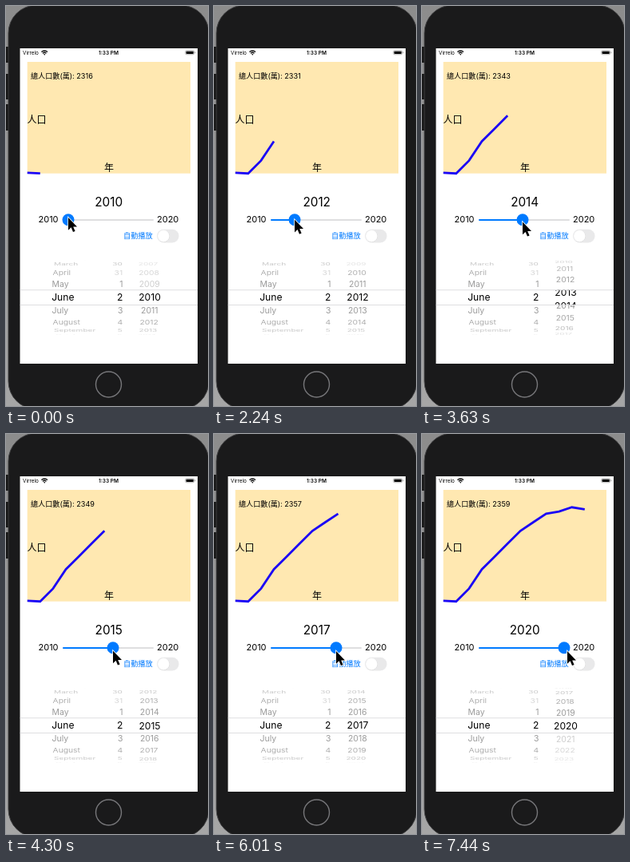
An HTML page that plays this animation: 253x501 px, repeating every 8 s.

```html
<!DOCTYPE html>
<html lang="zh-Hant">
<head>
<meta charset="utf-8">
<title>Population chart</title>
<style>
  html, body { margin: 0; width: 100%; height: 100%; overflow: hidden; background: linear-gradient(#8c8c8c, #a6a6a6); }
  svg { display: block; width: 100vw; height: 100vh; font-family: Inter, "Noto Sans CJK TC", "Noto Sans CJK", sans-serif; }
</style>
</head>
<body>
<svg viewBox="0 0 253 501">
  <defs>
    <clipPath id="band"><rect x="18" y="356" width="222" height="18.5"/></clipPath>
    <clipPath id="wheel"><path d="M18 318H240V356H18ZM18 374.5H240V412H18Z"/></clipPath>
  </defs>

  <!-- Phone -->
  <path d="M0 51h4v20H0zM0 85h4v32H0zM0 123h4v33H0z" fill="#161616"/>
  <rect x="3" y="-1" width="251" height="506" rx="35" fill="#1a1a1b" stroke="#3c3c3e"/>
  <circle cx="128.5" cy="474" r="16" fill="none" stroke="#77777a" stroke-width="1.4"/>
  <rect x="17.5" y="53" width="222.5" height="395" fill="#fff"/>

  <!-- Status bar -->
  <text x="21" y="61" font-size="6.4">Virrelo</text>
  <path d="M44.4 57.6q3.8-3.2 7.6 0M45.9 59.2q2.3-1.9 4.6 0" fill="none" stroke="#000" stroke-width="1.3"/>
  <path d="M47 60.5q1.2-.9 2.4 0l-1.2 1.3z"/>
  <text x="128.5" y="61" font-size="6.5" font-weight="600" text-anchor="middle">1:33 PM</text>
  <rect x="224.7" y="55.8" width="11" height="5" rx="1.5" fill="none" stroke="#888" stroke-width=".6"/>
  <rect x="225.6" y="56.7" width="9.2" height="3.2" rx=".7"/>
  <path d="M236.7 57.4v1.8" stroke="#888" stroke-width=".8"/>

  <!-- Chart -->
  <rect x="26.7" y="70" width="204.3" height="139.7" fill="#ffe8b1"/>
  <text id="total" x="31" y="91.3" font-size="9.1"></text>
  <text x="26.5" y="147" font-size="12">人口</text>
  <text x="123" y="206.7" font-size="12">年</text>
  <polyline id="line" fill="none" stroke="#1b06f5" stroke-width="2.8"/>

  <!-- Slider and switch -->
  <text id="year" x="128.7" y="251.3" font-size="15.3" text-anchor="middle"></text>
  <text x="40.5" y="271.3" font-size="11">2010</text>
  <text x="189" y="271.3" font-size="11">2020</text>
  <rect x="71" y="267" width="114" height="2" rx="1" fill="#dedee0"/>
  <rect id="fill" x="71" y="267" height="2" rx="1" fill="#007aff"/>
  <text x="147" y="291.3" font-size="9.2" fill="#007aff">自動播放</text>
  <rect x="189" y="279.8" width="27.6" height="16.6" rx="8.3" fill="#e9e9ea"/>
  <circle cx="197.5" cy="288.6" r="7.4" opacity=".08"/>
  <circle cx="197.3" cy="288.1" r="7.3" fill="#fff"/>
  <circle id="knob" cy="267.7" r="7.5" fill="#007aff"/>

  <!-- Date picker -->
  <g id="soft" clip-path="url(#wheel)" fill="#949494" font-size="10.5"></g>
  <g id="bold" clip-path="url(#band)" font-size="12.1"></g>
  <path d="M17.5 355.7H240M17.5 374.5H240" stroke="#d2d2d4" stroke-width=".7"/>

  <path id="cursor" d="M0 0V15.7L3.6 12.3 6 18 8.6 16.9 6.2 11.4H11Z" stroke="#fff" stroke-width="1.6" paint-order="stroke"/>
</svg>

<script>
const LOOP = 8000, DRAG = 80, TURN = 300;
const FIRST = 2010, LAST = 2020, KNOB_MIN = 78, KNOB_MAX = 178;
const $ = id => document.getElementById(id);
const months = "February March April May June July August September October".split(" ");
// Population in units of ten thousand, from the year before FIRST
const totals = [2316.3, 2316, 2322, 2331, 2337, 2343, 2349, 2353, 2357, 2358, 2360, 2359];
// Pointer drags: start time, x reached
const drags = [
  [390, 92], [1435, 101], [2320, 107], [2730, 114], [3487, 126], [4010, 134],
  [4700, 137], [4960, 146], [5320, 153], [6020, 163], [6655, 174], [7140, 182]
];

const clamp = p => Math.min(1, Math.max(0, p));
const smooth = p => (p = clamp(p), p * p * (3 - 2 * p));

// Moments at which a drag carries the slider into the next year
const turns = [];
drags.forEach(([start, to], i) => {
  const from = i ? drags[i - 1][1] : KNOB_MIN;
  const edge = KNOB_MIN - .5 + 10 * (turns.length + 1);
  if (to >= edge) turns.push(start + DRAG * (edge - from) / (to - from));
});

function pointerX(t) {
  return drags.reduce((x, [start, to]) => x + (to - x) * clamp((t - start) / DRAG), KNOB_MIN);
}

// One row on the wheel, `off` rows away from the centre
function row(label, x, anchor, off, enabled = true) {
  const a = off * Math.PI / 9, c = Math.cos(a);
  if (c <= 0) return "";
  const sx = .92 + .08 * c, px = 128.5 + (x - 128.5) * sx;
  return `<text text-anchor="${anchor}" opacity="${enabled ? c : c / 2}" dy=".36em" ` +
    `transform="translate(${px} ${365 + 48 * Math.sin(a)}) scale(${sx} ${c})">${label}</text>`;
}

function wheel(pos) {
  let rows = "";
  for (let i = -4; i <= 4; i++) {
    const day = (i + 32) % 31 + 1, year = Math.round(pos) + i;
    rows += row(months[4 + i], 57.2, "start", i);
    rows += row(day, 146.5, "end", i, day <= 30);
    rows += row(year, 180, "middle", year - pos, year >= FIRST && year <= LAST);
  }
  return rows;
}

function draw(now) {
  const t = now % LOOP;
  const n = turns.filter(s => t >= s).length;
  const pos = turns.reduce((sum, s) => sum + smooth((t - s) / TURN), FIRST);
  const x = pointerX(t), knob = Math.min(x, KNOB_MAX);
  const points = totals.slice(0, n + 2).map((v, i) => [26.7 + 16.1 * i, 209.7 - 2.68 * (v - 2316)]);

  $("total").textContent = `總人口數(萬): ${totals[n + 1]}`;
  $("year").textContent = FIRST + n;
  $("line").setAttribute("points", points.join(" "));
  $("fill").setAttribute("width", knob - 71);
  $("knob").setAttribute("cx", knob);
  $("cursor").setAttribute("transform", `translate(${x} ${265 + 7 * clamp((x - KNOB_MIN) / 60)})`);
  $("soft").innerHTML = $("bold").innerHTML = wheel(pos);
  requestAnimationFrame(draw);
}
requestAnimationFrame(draw);
</script>
</body>
</html>
```
